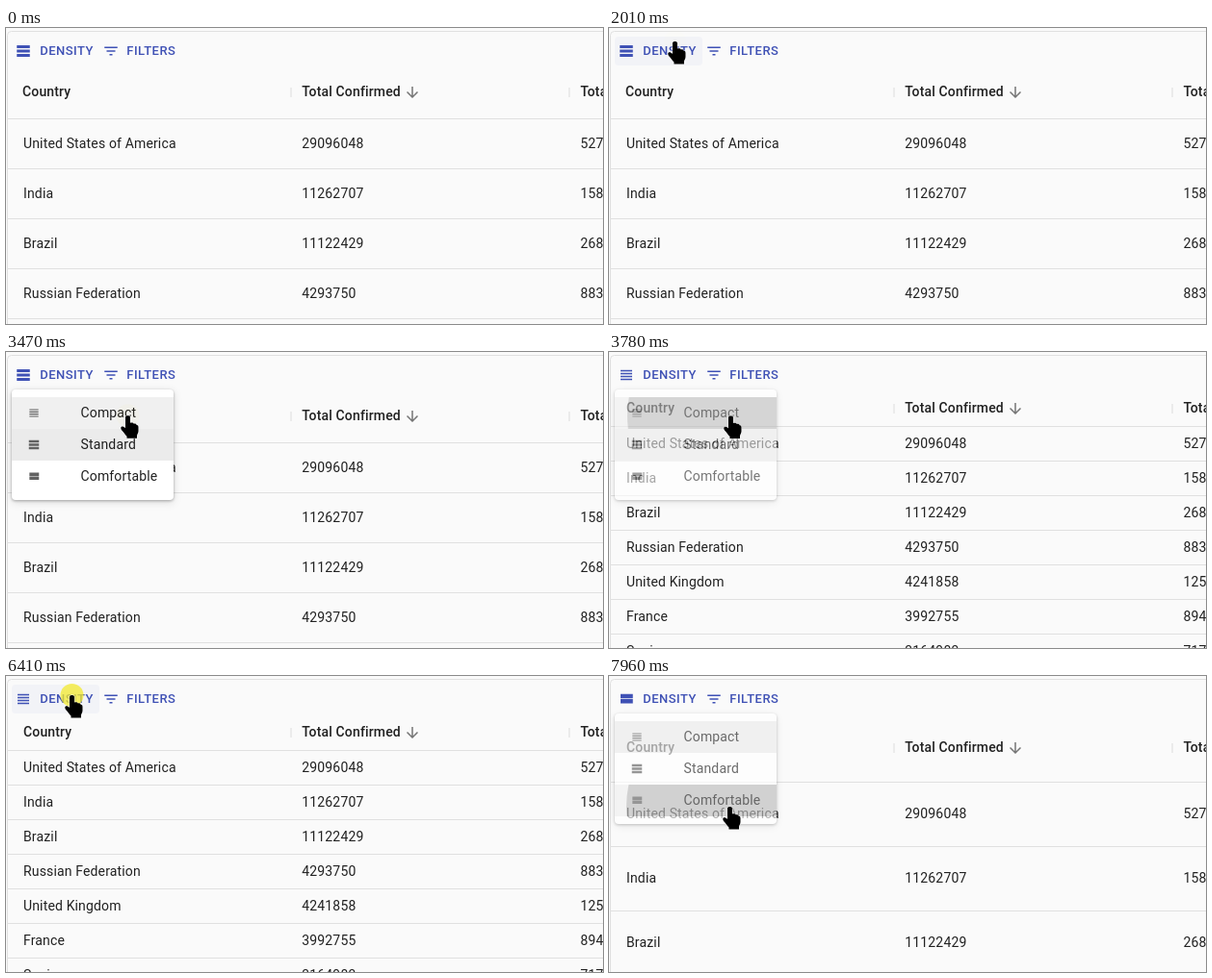
Recreate the animation shown at these times as an HTML page. Size 620x308 px, loop 8000 ms.

```html
<!DOCTYPE html>
<html lang="en">
<head>
<meta charset="utf-8">
<title>Grid density</title>
<style>
html, body { margin: 0; width: 100%; height: 100%; overflow: hidden; background: #fafafa; }
svg { display: block; width: 620px; height: 308px; }
text { font: 400 14px Roboto, sans-serif; letter-spacing: .15px; fill: rgba(0,0,0,.87); white-space: pre; }
.head { font-weight: 500; }
.btn { font-weight: 500; font-size: 13px; letter-spacing: .46px; fill: #3f51b5; }
.paper { filter: drop-shadow(0 1px 1.5px rgba(0,0,0,.3)) drop-shadow(0 2px 4px rgba(0,0,0,.12)); }
</style>
</head>
<body>
<svg id="stage" viewBox="0 0 620 308"></svg>
<script>
const LOOP = 8000, STEP = 77.2;
const stage = document.getElementById('stage');

const rows = [
  ['United States of America', '29096048', '527699'],
  ['India', '11262707', '158189'],
  ['Brazil', '11122429', '268370'],
  ['Russian Federation', '4293750', '88328'],
  ['United Kingdom', '4241858', '125168'],
  ['France', '3992755', '89400'],
  ['Spain', '3164983', '71727'],
];

// line: bottom of the header, mid: centre of its text
const densities = {
  Compact: { line: 77, mid: 58, height: 36, nameX: 18, icon: 'M4 15h16v-2H4zm0 4h16v-2H4zm0-8h16V9H4zm0-6v2h16V5z' },
  Standard: { line: 94, mid: 66, height: 52, nameX: 17, icon: 'M21 8H3V4h18zM21 10H3v4h18zM21 16H3v4h18z' },
  Comfortable: { line: 110, mid: 74, height: 67, nameX: 18, icon: 'M4 18h17v-6H4zM4 5v6h17V5z' },
};
const FILTER = 'M10 18h4v-2h-4zM3 6v2h18V6zm3 7h12v-2H6z';
const ARROW_DOWN = 'M20 12l-1.41-1.41L13 16.17V4h-2v12.17l-5.58-5.59L4 12l8 8z';
const HAND = 'M-3 1.5C-3-.6 2-.6 2 1.5V7.5C3.5 6.8 5.5 7.3 5.8 8.6 7 8 8.4 8.6 8.6 9.8 9.8 9.6 10.5 10.5 10.5 12V16' +
  'C10.5 18 9 19.5 9 21V23.5H-1.5V21.5C-3.5 19.5-5 17-6.5 15.5-8.3 13.5-8 11-6 11.2-4.5 11.4-3.5 12.4-3 13Z';
const POINTER = 'M0 0V16L3.7 12.6 6.2 18.7 9 17.5 6.5 11.6H11.5Z';

// time, x, y, eased
const path = [
  [849, 597, 278], [1004, 455, 215], [1158, 240, 120], [1312, 101, 55], [1467, 76, 22], [1621, 69, 14],
  [2475, 69, 14], [2780, 112, 60], [3165, 127, 66],
  [4410, 127, 67], [4940, 161, 207, 1],
  [5270, 161, 207], [5800, 101, 79, 1], [5880, 101, 79], [6260, 69, 20, 1],
  [6770, 69, 20], [7030, 108, 112], [7260, 126, 136], [LOOP, 126, 136],
];
const clicks = [2000, 3460, 6325, 7635];
const OPEN = 210, OPEN_TIME = 200, CLOSE = 275, CLOSE_TIME = 120;

const clamp = v => Math.max(0, Math.min(1, v));
const easeOut = v => 1 - (1 - v) ** 3;

function cursorAt(t) {
  const i = path.findIndex(p => p[0] > t);
  if (i < 1) return null;
  const a = path[i - 1], b = path[i];
  let k = (t - a[0]) / (b[0] - a[0]);
  if (b[3]) k = k * k * (3 - 2 * k);
  return { x: a[1] + (b[1] - a[1]) * k, y: a[2] + (b[2] - a[2]) * k };
}

const rect = (x, y, w, h, fill, extra = '') =>
  `<rect x="${x}" y="${y}" width="${w}" height="${h}" fill="${fill}" ${extra}/>`;
const text = (x, y, s, cls = '') => `<text x="${x}" y="${y}" class="${cls}">${s}</text>`;
const icon = (x, y, size, d, fill) =>
  `<path transform="translate(${x} ${y}) scale(${size / 24})" d="${d}" fill="${fill}"/>`;
const shade = a => `rgba(0,0,0,${a})`;

function grid(d, hoverY) {
  let out = '';
  rows.forEach((cells, i) => {
    const top = d.line + i * d.height, base = Math.floor(top + d.height / 2) + 5;
    if (hoverY > top && hoverY <= top + d.height) out += rect(2, top + 1, 618, d.height - 1, shade(.04));
    out += rect(2, top, 618, 1, '#e0e0e0');
    cells.forEach((s, c) => out += text([18, 307.3, 596.5][c], base, s));
  });
  out += text(d.nameX, d.mid + 5, 'Country', 'head');
  out += text(307.3, d.mid + 5, 'Total Confirmed', 'head');
  out += text(596.5, d.mid + 5, 'Total Deaths', 'head');
  out += icon(413, d.mid - 8, 18, ARROW_DOWN, '#757575');
  for (const x of [295.5, 584.5]) out += rect(x, d.mid - 4, 1, 10, '#dcdcdc');
  return out;
}

function toolbar(d, tint) {
  return (tint ? rect(6, 9, 91, 30, `rgba(63,81,181,${tint})`, 'rx="4"') : '') +
    icon(9, 15, 18, d.icon, '#3f51b5') + text(35.3, 28, 'DENSITY', 'btn') +
    icon(100, 15, 18, FILTER, '#3f51b5') + text(125.3, 28, 'FILTERS', 'btn');
}

function menu(selected, at, grow, opacity, pressed) {
  const sx = .75 + .25 * grow, sy = .56 + .44 * grow;
  let out = `<g opacity="${opacity}" transform="translate(6 39) scale(${sx} ${sy}) translate(-6 -39)">` +
    rect(6, 39, 168, 115, '#fff', 'rx="4" class="paper"');
  Object.keys(densities).forEach((name, i) => {
    const y = 47 + 33 * i, over = at.y > y && at.y <= y + 33;
    const fill = name === selected ? .08 : over ? .06 : 0;
    if (fill) out += rect(6, y, 168, 33, shade(fill));
    if (over && pressed > 80) {
      const r = 108 * clamp((pressed - 80) / 230);
      out += `<clipPath id="item">${rect(6, y, 168, 33, '#000')}</clipPath>` +
        `<circle cx="${at.x}" cy="${at.y}" r="${r}" fill="${shade(.21)}" clip-path="url(#item)"/>`;
    }
    out += icon(22, y + 9.5, 14, densities[name].icon, '#616161') + text(77.5, y + 21, name);
  });
  return out + '</g>';
}

function draw(t) {
  const at = cursorAt(t);
  const n = clicks.filter(c => c <= t).length;
  const since = n ? t - clicks[n - 1] : Infinity;
  const opening = n % 2 === 1, closing = n > 0 && !opening;
  const picked = n - (closing && since < CLOSE ? 1 : 0);
  const name = picked < 2 ? 'Standard' : picked < 4 ? 'Compact' : 'Comfortable';
  const before = n <= 2 ? 'Standard' : 'Compact';
  const d = densities[name];

  const grow = opening ? easeOut(clamp((since - OPEN) / OPEN_TIME)) : 1;
  const opacity = opening ? grow : closing ? 1 - clamp((since - CLOSE) / CLOSE_TIME) : 0;
  const onButton = at && at.x > 6 && at.x < 97 && at.y > 9 && at.y < 39;
  const tint = !onButton ? 0 : opening && since > 150 ? .085 : .04;

  let out = '<rect x="1.5" y="3.5" width="640" height="330" rx="4" fill="#fafafa" stroke="#e0e0e0"/>';
  out += grid(d, at && !opacity ? at.y : -1) + toolbar(d, tint);
  if (opacity > 0) out += menu(before, at, grow, opacity, closing ? since : 0);
  if (at) {
    const ring = .75 * clamp(since / 70) ** 2 * clamp((270 - since) / 70);
    if (ring > 0) out += `<circle cx="${at.x - .5}" cy="${at.y}" r="12" fill="#f3ea2e" opacity="${ring}"/>`;
    const hand = opacity > 0 || at.y < d.line;
    out += `<path transform="translate(${at.x} ${at.y})" d="${hand ? HAND : POINTER}" fill="#000" ` +
      'stroke="#fff" stroke-width=".8" paint-order="stroke"/>';
  }
  stage.innerHTML = out;
}

let last = -1;
function tick() {
  const step = Math.floor((performance.now() % LOOP + 5) / STEP);
  if (step !== last) draw((last = step) * STEP);
  requestAnimationFrame(tick);
}
tick();
</script>
</body>
</html>
```
